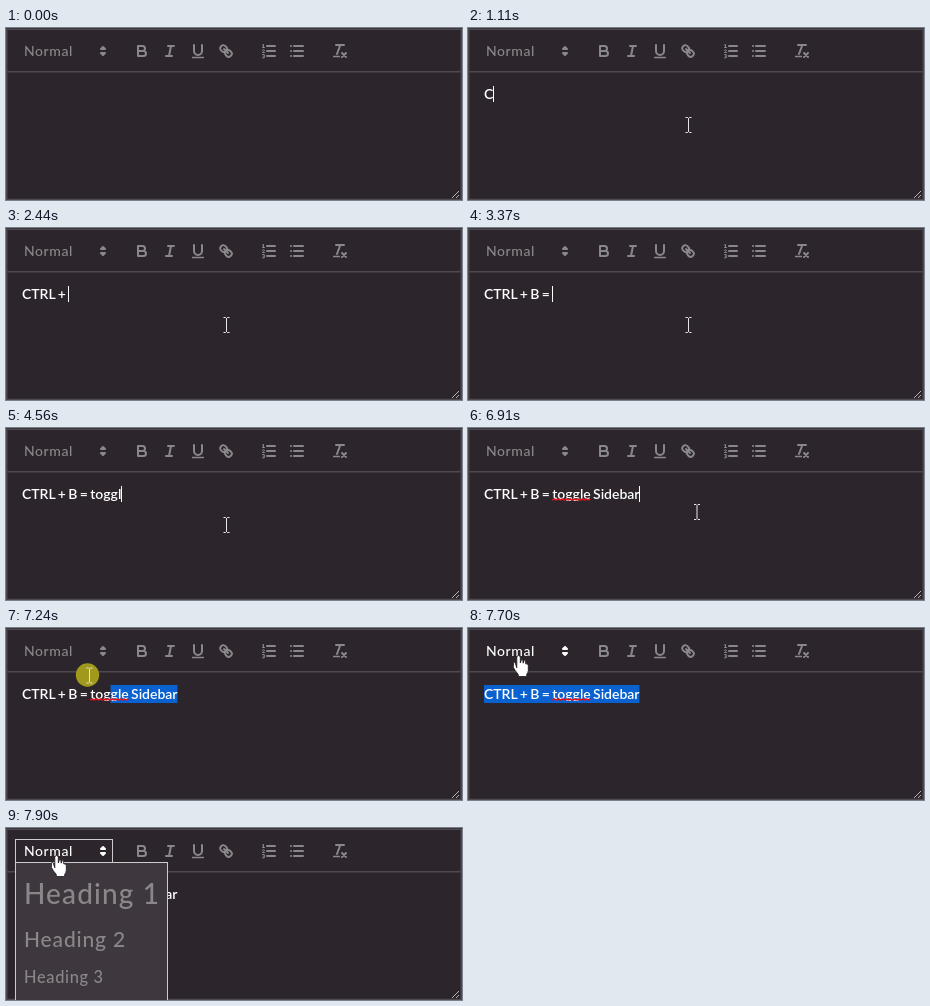
An HTML page for the animation above (8 s loop, 456x172 px).

```html
<!DOCTYPE html>
<html lang="en">
<head>
<meta charset="utf-8">
<title>Rich text editor</title>
<style>
  html, body { margin: 0; width: 100%; height: 100%; overflow: hidden; background: #2c262c; }
  svg { display: block; }
  text { font-family: Lato, "Open Sans", sans-serif; white-space: pre; }
  .icon { fill: none; stroke: #8a878a; stroke-width: 2; stroke-linecap: round; stroke-linejoin: round; }
  .icon .thin { stroke-width: 1; }
  .icon .solid { fill: #8a878a; stroke: none; }
  .ui { fill: #8a878a; font-weight: 500; letter-spacing: .04em; }
  .hover .ui { fill: #fff; }
  .hover .icon { stroke: #fff; }
  #line { fill: #fff; font-size: 14px; font-weight: 600; letter-spacing: -.03px; word-spacing: -1px; }
</style>
</head>
<body>
<svg width="456" height="172" viewBox="0 0 456 172">
  <rect width="456" height="172" fill="#2c262c"/>
  <path d="M.75 172V1.25H455.25V172M.75 43.75H455.25M.75 171.5H455.25" fill="none" stroke="#4d494d" stroke-width="1.5"/>
  <path d="M446 170l7-7M450 170l3-3" stroke="#b5b2b5"/>

  <g class="icon" transform="translate(127 14)">
    <path d="M5 4H9.5a2.5 2.5 0 0 1 0 5H5zM5 9h5.5a2.5 2.5 0 0 1 0 5H5z"/>
  </g>
  <g class="icon" transform="translate(155 14)">
    <path d="M7 4h6M5 14h6M8 14L10 4"/>
  </g>
  <g class="icon" transform="translate(183 14)">
    <path d="M5 3v6a4 4 0 0 0 8 0V3"/>
    <rect class="solid" x="3" y="14.7" width="12" height="1.6" rx=".5"/>
  </g>
  <g class="icon" transform="translate(211 14)">
    <path d="M7 7l4 4M8.9 4.58a3.48 3.48 0 0 1 .36 4.68A3.48 3.48 0 0 1 4.58 8.9C3.19 7.5 2.04 6.4 4.22 4.22S7.5 3.19 8.9 4.58z"/>
    <path d="M13.42 9.1a3.48 3.48 0 0 0-4.68-.36a3.48 3.48 0 0 0 .36 4.68c1.39 1.39 2.5 2.54 4.68.36S14.82 10.5 13.42 9.1z"/>
  </g>
  <g class="icon" transform="translate(254 14)">
    <path d="M7 4h8M7 9h8M7 14h8"/>
    <path class="thin" d="M2.5 5.5h2M3.5 5.5v-3l-1 .5M4.5 10.5h-2c0-.3 1.9-1.1 1.9-2a.9.9 0 0 0-1.8-.1M2.5 12.6h1.4a.7.7 0 0 1 0 1.6h-.6h.6a.7.7 0 0 1 0 1.6H2.5"/>
  </g>
  <g class="icon" transform="translate(282 14)">
    <path d="M6 4h9M6 9h9M6 14h9M3 4h.01M3 9h.01M3 14h.01"/>
  </g>
  <g class="icon" transform="translate(325 14)">
    <path d="M5 3h8M6 12L9.35 3M11 11l4 4M15 11l-4 4"/>
    <rect class="solid" x="2" y="13.7" width="7" height="1.6" rx=".5"/>
  </g>

  <rect id="sel" y="57" height="18" fill="#0a62d0"/>
  <text id="line" x="16" y="71"></text>
  <path id="squiggle" fill="none" stroke="#e0141e" stroke-width="1.5"/>
  <rect id="caret" y="58" width="1" height="16" fill="#fff"/>

  <g id="picker">
    <rect id="frame" x="9.5" y="11.5" width="97" height="24" fill="none" stroke="#ccc"/>
    <text class="ui" x="18" y="28" font-size="14">Normal</text>
    <g class="icon" transform="translate(88 14)">
      <path d="M7 11l2 2 2-2zM7 7l2-2 2 2z"/>
    </g>
  </g>
  <g id="menu">
    <rect x="9.5" y="34.5" width="152" height="150" fill="#3e383e" stroke="#ccc"/>
    <text class="ui" x="18" y="75.5" font-size="28">Heading 1</text>
    <text class="ui" x="18" y="119" font-size="21">Heading 2</text>
    <text class="ui" x="18" y="155" font-size="16.4">Heading 3</text>
  </g>

  <circle id="press" r="11.7" fill="#a1991b"/>
  <path id="beam" fill="none" stroke="#e6e4e6" d="M-3-7.5H-.7M.7-7.5H3M0-7V7M-3 7.5H-.7M.7 7.5H3"/>
  <path id="hand" fill="#fff" stroke="#1c181c" stroke-width=".8" stroke-linejoin="round"
    d="M-1.7 1.3Q-1.5-.5 0-.5T1.8 1.3V7Q4-.0 4.7 7.2Q7-.0 7.3 8Q9.8 7 9.8 9.8V14.5Q9.5 17 8.2 18.2V20.5H-.2V18.5Q-3.5 14.8-5.2 11.2Q-5-.0-1.7 11.8z"/>
</svg>

<script>
const LOOP = 8000;
const TEXT = "CTRL + B = toggle Sidebar";
const KEYS = [1110, 1440, 1640, 1910, 2170, 2370, 2440, 2900, 3100, 3300, 3370, 3900, 3970,
  4360, 4490, 4560, 4700, 4760, 5020, 5220, 5360, 5620, 5820, 6170, 6370];

// time, x, y, shape, button down
const MOUSE = [
  [0, 0, 0, ""],
  [70, 350, 167, "beam"],
  [140, 300, 140, "beam"],
  [200, 252, 113, "beam"],
  [270, 227, 100, "beam"],
  [330, 220.5, 97, "beam", true],
  [460, 220.5, 97, "beam"],
  [6910, 229, 84, "beam"],
  [6980, 236, 70, "beam"],
  [7040, 236, 66, "beam", true],
  [7110, 192, 61, "beam", true],
  [7170, 132, 53, "beam", true],
  [7240, 83.5, 47.5, "beam", true],
  [7310, 75, 47.5, "beam", true],
  [7570, 66, 46, "beam"],
  [7630, 54, 32, "hand"],
  [7700, 50.5, 28, "hand"],
  [7830, 50.5, 28, "hand", true],
  [7900, 50.5, 28, "hand"]
];

// time, first selected character
const SELECT = [[0, 25], [7170, 21], [7240, 14], [7310, 0], [7900, 25]];
const CARET = [[0, 0], [330, 1], [850, 0], [1110, 1], [7170, 0]];

const $ = id => document.getElementById(id);
const at = (steps, t) => steps.findLast(s => s[0] <= t);
const show = (id, on) => $(id).setAttribute("visibility", on ? "visible" : "hidden");
const set = (id, attrs) => {
  for (const k in attrs) $(id).setAttribute(k, attrs[k]);
};

$("line").textContent = TEXT;
const edges = [...TEXT, ""].map((_, i) => 16 + (i ? $("line").getSubStringLength(0, i) : 0));

let wave = `M${edges[11]} 72`;
for (let x = edges[11], up = true; x < edges[17] - 2; x += 2, up = !up) wave += `l2 ${up ? -1 : 1}`;
set("squiggle", { d: wave });

function render(t) {
  const typed = KEYS.filter(k => k <= t).length;
  $("line").textContent = TEXT.slice(0, typed);
  show("squiggle", typed >= 18);
  set("caret", { x: Math.round(edges[typed] - .5) });
  show("caret", at(CARET, t)[1]);

  const from = edges[at(SELECT, t)[1]];
  set("sel", { x: from, width: edges[25] - from });

  const [, x, y, shape, down] = at(MOUSE, t);
  for (const id of ["beam", "hand"]) {
    set(id, { transform: `translate(${x} ${y})` });
    show(id, shape === id);
  }
  set("press", { cx: x - 2, cy: y - .5 });
  show("press", down);

  $("picker").classList.toggle("hover", t >= 7630);
  show("frame", t >= 7900);
  show("menu", t >= 7900);
}

function tick() {
  render(performance.now() % LOOP);
  requestAnimationFrame(tick);
}
tick();
</script>
</body>
</html>
```
